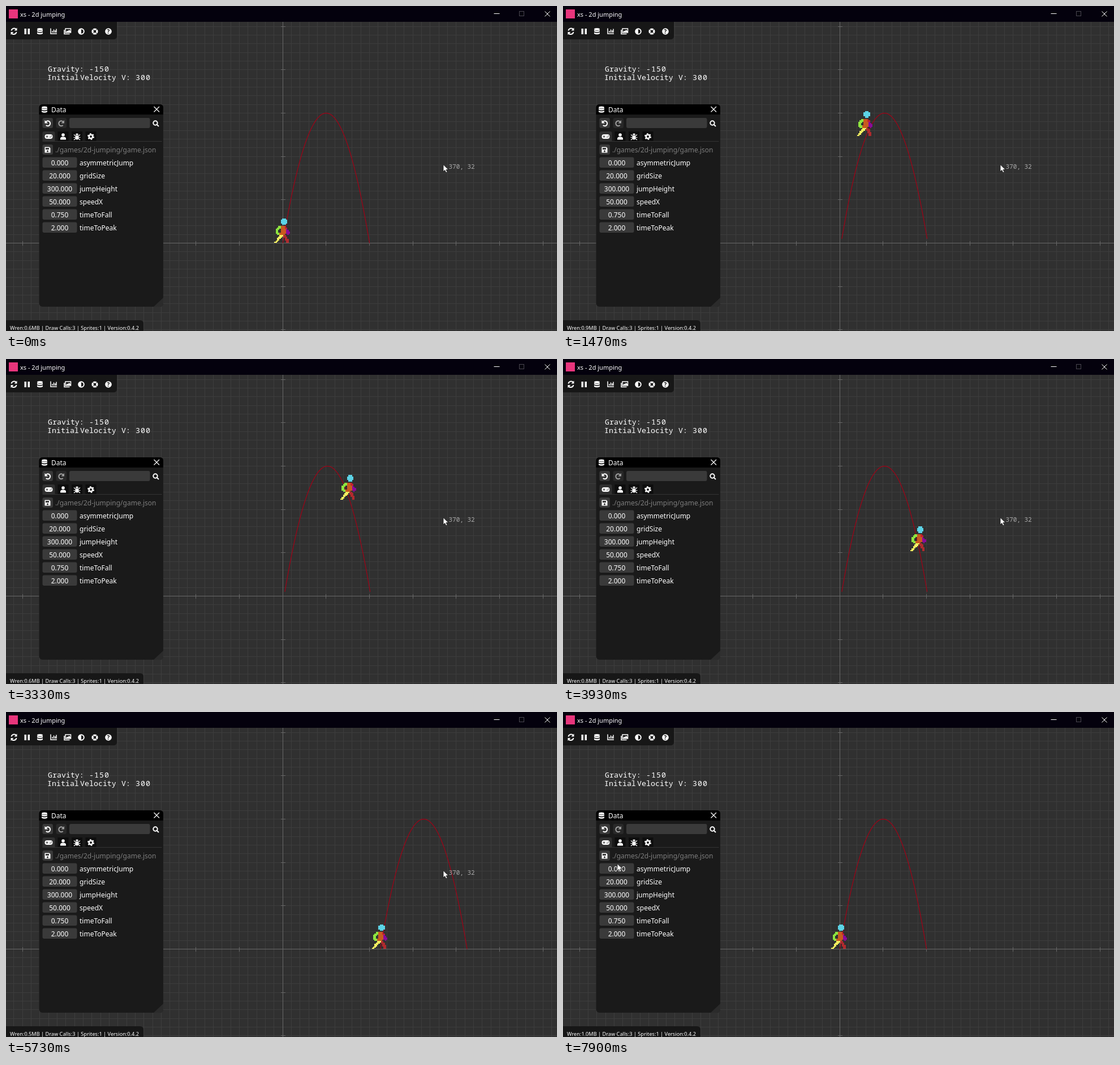
Animation of 974 by 575 pixels, one loop 8000 ms. Source, as an HTML page:

```html
<!DOCTYPE html>
<html lang="en">
<head>
<meta charset="utf-8">
<title>2d jumping</title>
<style>
  html, body { margin: 0; width: 100%; height: 100%; overflow: hidden; background: #303030; }
  svg { display: block; width: 974px; height: 575px; }
  text { font: 12px "Noto Sans", sans-serif; fill: #fff; white-space: pre; }
  .pixel { font: 13.3px "Noto Sans Mono", monospace; }
  .wide { letter-spacing: 1px; }
  .crisp { shape-rendering: crispEdges; }
  .line { fill: none; stroke: #fff; stroke-width: 2; }
  .icon { fill: #fff; }
  .field { fill: #3a3a3a; }
</style>
</head>
<body>
<svg viewBox="0 0 974 575">
  <rect width="974" height="575" fill="#303030"/>
  <path id="grid" class="crisp" fill="none" stroke="#3d3d3d"/>
  <path id="axes" class="crisp" fill="none" stroke="#696969"/>

  <text class="pixel" y="116"><tspan x="74">Gravity:</tspan><tspan x="147" class="wide">-150</tspan></text>
  <text class="pixel" y="131"><tspan x="73">Initial</tspan><tspan x="131">Velocity</tspan><tspan x="204">V:</tspan><tspan x="229" class="wide">300</tspan></text>

  <path id="arc" fill="none" stroke="#a30016" stroke-width="1.2"/>
  <g id="player" class="crisp">
    <path fill="#8ee53f" d="M2 7h1v-1h2v2h-1v1h-1v2h1v1h1v1h-3v-1h-1v-4h1z"/>
    <path fill="#8a0a9a" d="M9 7h1v2h1v1h1v2h-1v1h-1v-1h-1z"/>
    <path fill="#f4f060" d="M4 13h3v1h-1v1h-1v1h-1v1h-1v1h-1v1h-2v-1h1v-1h1v-2h1v-1h1z"/>
    <path fill="#b02a2e" d="M7 13h2v1h1v2h1v3h-2v-2h-1v-2h-1z"/>
    <path fill="#c85a1e" d="M5 6h3v1h1v5h-1v1h-4v-2h1z"/>
    <path fill="#c8202c" d="M8 6h1v1h1v1h-2z"/>
    <path fill="#5cd3e6" d="M6 0h3v1h1v3h-1v1h-3v-1h-1v-3h1z"/>
  </g>
  <text id="coords" class="pixel" style="font-size:11px;fill:#a8a8a8"></text>

  <!-- title bar -->
  <rect width="974" height="28" fill="#04010d"/>
  <rect x="5" y="6" width="16" height="16" fill="#e8357c"/>
  <text x="25" y="18.5" style="font-size:11px">xs - 2d jumping</text>
  <path class="line" style="stroke-width:1" d="M862.5 13.5h10M952.5 9.5l9 9m0-9l-9 9"/>
  <rect x="907.5" y="9.5" width="8" height="8" fill="none" stroke="#4a4850"/>

  <!-- toolbar -->
  <path fill="#171717" d="M0 28h196v25q0 6-6 6H0z"/>
  <path class="line" d="M9.5 43.500a5 5 0 0 1 8.500-2.500M18.500 46a5 5 0 0 1-8.500 2.500"/>
  <path class="icon" d="M19.500 38.500v5h-5zM8.500 51v-5h5zM32.500 40h3.500v10h-3.500zM38.500 40h3.500v10h-3.500z"/>
  <g id="database" class="icon">
    <ellipse cx="60" cy="41" rx="5" ry="2"/>
    <path d="M55 42.500q5 2.500 10 0v2.500q-5 2.500-10 0zM55 46.500q5 2.500 10 0v2.500q-5 2.500-10 0z"/>
  </g>
  <use href="#database" x="8" y="138.500"/>
  <path class="line" style="stroke-width:1.5" d="M79 39.500v9.500h11M82 47v-3M84.500 47v-5.500M87 47v-4M89 47v-6.500"/>
  <path class="line" style="stroke-width:1.5" d="M105 40h9.500v7h-9.500zM103 42v7.500h9.500"/>
  <path class="icon" d="M106 46l2-2.500 1.500 1 2-2.500 2.500 2.500v1.500z"/>
  <circle class="line" cx="133" cy="45" r="4.800" stroke-width="1.500"/>
  <path class="icon" d="M133 40a5 5 0 0 0 0 10z"/>
  <circle class="line" cx="157" cy="45" r="4" style="stroke-width:3.200"/>
  <path stroke="#171717" d="M153 41l2.500 2.500M161 41l-2.500 2.500M153 49l2.500-2.500M161 49l-2.500-2.500"/>
  <circle class="icon" cx="181" cy="45" r="5.800"/>
  <text x="181" y="48.500" text-anchor="middle" style="font-size:10px;font-weight:800;fill:#171717">?</text>

  <!-- data panel -->
  <rect x="58.500" y="174" width="219.500" height="358" rx="6" fill="#1a1a1a"/>
  <path fill="#000" d="M58.500 192v-12q0-6 6-6h207.500q6 0 6 6v12z"/>
  <path fill="#2b2b2b" d="M278 516v10q0 6-6 6h-11z"/>
  <use href="#database" x="8" y="138.500"/>
  <text x="80" y="187.500">Data</text>
  <path class="line" style="stroke-width:1.200" d="M261.500 178l9.500 9.500m0-9.500l-9.500 9.500"/>
  <g class="field">
    <rect x="64.500" y="198" width="18.500" height="18" rx="3"/>
    <rect x="88.500" y="198" width="18.500" height="18" rx="3" fill="#292929"/>
    <rect x="112" y="198" width="142.500" height="18" rx="3"/>
    <path d="M64.500 239v-14q0-3 3-3h16q3 0 3 3v14z" fill="#303030"/>
    <rect x="64.500" y="245" width="18.500" height="18" rx="3"/>
  </g>
  <path fill="#0d0d0d" d="M91.500 222h19v17h-19zM116 222h19v17h-19zM140.500 222h19v17h-19z"/>
  <path stroke="#343434" d="M64.500 239.500h211"/>
  <g id="undo">
    <path class="line" d="M70 205.500a4.400 4.400 0 1 1 .8 5.500"/>
    <path class="icon" d="M68.500 202v5.500h5.500z"/>
  </g>
  <use href="#undo" transform="matrix(-1 0 0 1 171.500 0)" opacity=".55"/>
  <circle class="line" cx="264" cy="207" r="3.700"/>
  <path class="line" d="M266.500 209.500l3.500 3.500"/>
  <rect class="icon" x="68.500" y="227" width="14" height="8" rx="4"/>
  <path stroke="#303030" d="M70.500 231h4M72.500 229v4M77 232h2M79 230h2"/>
  <circle class="icon" cx="101" cy="228" r="2.800"/>
  <path class="icon" d="M96 236.500v-1.500q0-3.500 3.500-3.500h3q3.500 0 3.500 3.500v1.500z"/>
  <ellipse class="icon" cx="125.500" cy="232.500" rx="3" ry="4"/>
  <path class="line" style="stroke-width:1.200" d="M120 227.500l3 2.500M131 227.500l-3 2.500M119.500 232.500h12M120 237l3-2.500M131 237l-3-2.500"/>
  <path class="icon" d="M123 228a2.500 2.500 0 0 1 5 0z"/>
  <circle class="line" cx="150" cy="231" r="3.200" style="stroke-width:2.500"/>
  <circle class="line" cx="150" cy="231" r="5" stroke-dasharray="2.600 2.636"/>
  <path class="icon" fill-rule="evenodd" d="M68.500 249.500h8l2 2v8h-10zM70 251v3h6v-3zM73.500 255.300a1.600 1.600 0 1 0 .01 0z"/>
  <text x="87" y="258.500" style="fill:#7d7d7d">./games/2d-jumping/game.json</text>
  <g id="rows"></g>

  <!-- status bar -->
  <path fill="#171717" d="M0 556h237q6 0 6 6v13H0z"/>
  <text id="status" x="7" y="572.500" style="font-size:9.200px"></text>

  <path id="cursor" fill="#fff" stroke="#111" stroke-width=".8" d="M0 0v12.500l2.800-2.600 2 4.400 2.200-1-2-4.200h4z"/>
</svg>
<script>
const LOOP = 8000;
const SCALE = 0.76667;             // screen pixels per world unit
const ORIGIN = { x: 489.3, y: 419.5 };
const SPEED = 50, VELOCITY = 300, GRAVITY = -150;
const WALK_START = 285, JUMP_START = 312, LAND = 4312, WALK_END = 4805;
const BACK_START = 5710, BACK_END = 6370, RESET = 6800;
const MEMORY_STEPS = [0, 380, 760, 1130, 1520, 1890, 2250, 2610, 2980, 3350, 3720,
  4080, 4450, 5030, 5370, 5730, 6070, 6370, 6800, 7200, 7600];

const el = id => document.getElementById(id);
const clamp = (v, lo, hi) => Math.min(hi, Math.max(lo, v));
const height = s => VELOCITY * s + GRAVITY * s * s / 2;
const screenX = x => ORIGIN.x + x * SCALE;
const screenY = y => ORIGIN.y - y * SCALE;
const pixel = v => Math.floor(v) + 0.5;

function drawGrid() {
  let grid = '', axes = `M0 ${pixel(ORIGIN.y)}H974M${pixel(ORIGIN.x)} 28V575`;
  for (let k = -32; k <= 32; k++) {
    const x = pixel(screenX(k * 20)), y = pixel(screenY(k * 20));
    grid += `M${x} 28V575M0 ${y}H974`;
    if (k % 5 === 0) axes += `M${x} 415.5v8M485.5 ${y}h8`;
  }
  el('grid').setAttribute('d', grid);
  el('axes').setAttribute('d', axes);
}

function drawRows() {
  const data = { asymmetricJump: 0, gridSize: 20, jumpHeight: 300, speedX: 50, timeToFall: 0.75, timeToPeak: 2 };
  el('rows').innerHTML = Object.entries(data).map(([name, value], i) => {
    const y = 267.5 + i * 23;
    return `<rect class="field" x="64.500" y="${y}" width="61" height="18.500" rx="3"/>
      <text x="95" y="${y + 14}" text-anchor="middle">${value.toFixed(3)}</text>
      <text x="130" y="${y + 14}">${name}</text>`;
  }).join('');
}

function arcPath(startX, margin) {
  const points = [], steps = 80;
  for (let i = 0; i <= steps; i++) {
    const s = margin + (4 - 2 * margin) * i / steps;
    points.push(`${screenX(startX + SPEED * s).toFixed(2)} ${screenY(height(s)).toFixed(2)}`);
  }
  return 'M' + points.join('L');
}

function playerX(t) {
  if (t >= RESET) return 0;
  const forward = clamp(t, WALK_START, WALK_END) - WALK_START;
  const back = clamp(t, BACK_START, BACK_END) - BACK_START;
  return SPEED * (forward - back) / 1000;
}

function render(t) {
  const jumping = t >= JUMP_START && t < LAND;
  const x = playerX(t);
  const y = jumping ? height((t - JUMP_START) / 1000) : 0;
  el('player').setAttribute('transform', `translate(${screenX(x) - 15} ${screenY(y) - 44}) scale(2.3)`);
  el('arc').setAttribute('d', jumping ? arcPath(3, 0.033) : arcPath(x, 0));

  const p = clamp((t - 7180) / 700, 0, 1), ease = p * p * (3 - 2 * p);
  const mx = 773 - 677 * ease, my = 280.5 - 12 * ease;
  el('cursor').setAttribute('transform', `translate(${mx} ${my})`);
  const coords = el('coords');
  coords.setAttribute('x', mx + 9.5);
  coords.setAttribute('y', my + 7.5);
  coords.textContent = `${Math.floor((mx - ORIGIN.x) / SCALE)}, ${Math.round((305 - my) / SCALE)}`;

  const step = MEMORY_STEPS.filter(s => s <= t).length - 1;
  const memory = ((step + 3) % 8 + 3) / 10;
  el('status').textContent = `Wren:${memory.toFixed(1)}MB | Draw Calls:3 | Sprites:1 | Version:0.4.2`;
}

drawGrid();
drawRows();
const start = performance.now();
function frame() {
  render((performance.now() - start) % LOOP);
  requestAnimationFrame(frame);
}
frame();
</script>
</body>
</html>
```
